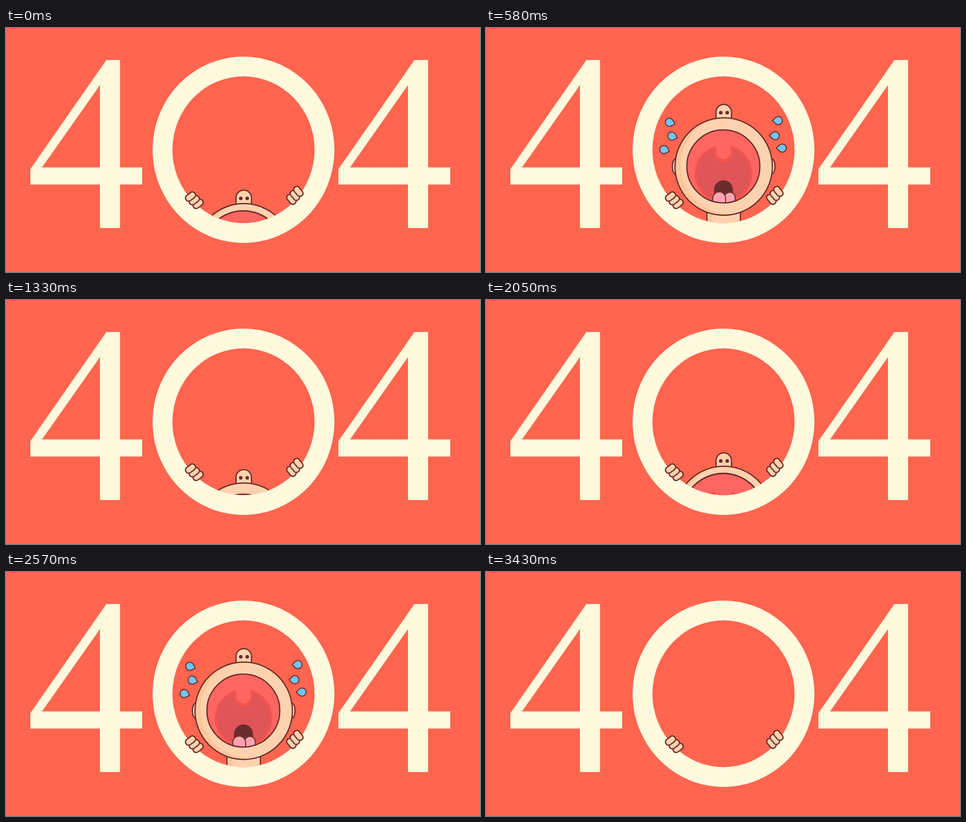
An HTML page for the animation above (3.52 s loop, 954 by 491 pixels).

```html
<!DOCTYPE html>
<html lang="en">
<head>
<meta charset="utf-8">
<title>404</title>
<style>
  html, body { margin: 0; width: 100%; height: 100%; overflow: hidden; background: #ff654f; }
  svg { display: block; width: 100%; height: 100%; }
  .line { stroke: #6b2c2a; stroke-width: 2.5; }
  .thin { stroke: #6b2c2a; stroke-width: 2; }
  .skin { fill: #ffd2af; }
  .shade { fill: #ffc59b; }
  .dark { fill: #6b2c2c; }
  .pink { fill: #ff6661; }
  .tongue { fill: #ffa3ae; }
  .tear { fill: #6fc6f8; }
  .cream { fill: #fff9dd; }
  .none { fill: none; }
</style>
</head>
<body>
<svg viewBox="0 0 954 491" role="img" aria-label="404">
  <defs>
    <path id="four" fill-rule="evenodd" d="M202 64.5H229.5V280.5H274V315H229.5V402.5H189V315H49V284ZM189 115L72.5 280.5H189Z"/>
    <path id="drop" d="M11.6 0L5.8 -5.8A8.2 8.2 0 1 0 5.8 5.8Z"/>
    <rect id="finger" x="-11.1" y="-6.3" width="22.2" height="12.6" rx="6"/>
    <g id="hand">
      <use href="#finger" x="1.6" y="10.5"/>
      <use href="#finger"/>
      <use href="#finger" x="-1.6" y="-10.5"/>
    </g>
    <clipPath id="hole"><path d="M335 0H621V245A143 147.6 0 0 1 335 245Z"/></clipPath>
    <clipPath id="face"><circle cx="478.4" cy="278.5" r="98"/></clipPath>
    <clipPath id="lips"><circle cx="477.7" cy="278.2" r="73"/></clipPath>
  </defs>

  <rect width="954" height="491" fill="#ff654f"/>
  <use href="#four" class="cream"/>
  <use href="#four" class="cream" x="620"/>
  <path class="cream" fill-rule="evenodd" d="M295 245a183 187.5 0 0 1 366 0a183 187.5 0 0 1 -366 0ZM335 245a143 147.7 0 0 0 286 0a143 147.7 0 0 0 -286 0Z"/>

  <g id="tears" class="tear thin"></g>

  <g clip-path="url(#hole)">
    <g id="body">
      <path class="shade" d="M444.5 350H512V620H444.5Z"/>
      <path class="skin" d="M456 350H512V620H456Z"/>
      <path class="line none" d="M444.5 350V620M512 350V620"/>
      <ellipse class="skin line" cx="381.5" cy="278.5" rx="6.5" ry="15"/>
      <ellipse class="skin line" cx="575.3" cy="278.5" rx="6.5" ry="15"/>
      <path class="skin line" d="M463 190V169a15.5 15.5 0 0 1 31 0V190Z"/>
      <circle class="dark" cx="472.5" cy="170" r="3.6"/>
      <circle class="dark" cx="485.5" cy="170" r="3.6"/>

      <circle class="shade" cx="478.4" cy="278.5" r="98"/>
      <circle class="skin" cx="490" cy="276" r="98" clip-path="url(#face)"/>
      <circle class="line none" cx="478.4" cy="278.5" r="98"/>

      <g id="mouth">
        <circle class="pink" cx="477.7" cy="278.2" r="73"/>
        <g clip-path="url(#lips)">
          <circle cx="478" cy="293" r="58" fill="#f3544f"/>
          <circle cx="478" cy="293" r="53.5" fill="#e05557"/>
          <circle cx="478" cy="250" r="20" fill="#f3544f"/>
          <path class="pink" d="M454 229Q467 236 464 250A14 14 0 0 0 492 250Q489 236 502 229Z"/>
          <path class="dark" d="M459 340V325a19 19 0 0 1 38 0V340Z"/>
          <path class="tongue thin" d="M480 356V340.5a10.7 10.7 0 0 1 21.4 0V356Z"/>
          <path class="tongue thin" d="M456.6 356V342a12.8 12.8 0 0 1 25.6 0V356Z"/>
        </g>
        <circle class="line none" cx="477.7" cy="278.2" r="73"/>
      </g>
    </g>
  </g>

  <g class="skin line">
    <use href="#hand" transform="translate(379 346.6) rotate(-37)"/>
    <use href="#hand" transform="translate(581.4 336.8) rotate(50)"/>
  </g>
</svg>
<script>
const LOOP = 3520, CYCLE = 2000, DEPTH = 250;
const $ = id => document.getElementById(id);
const clamp = x => Math.min(1, Math.max(0, x));
const ease = x => x * x * (3 - 2 * x);

// How far the body hangs below its highest pose: eased climb, accelerating drop.
const sink = u => DEPTH * (1 - ease(clamp((u + 350) / 950)))
  + 241 * Math.max(0, (u - 900) / 509) ** 1.5;

const gape = u => 1.07 + 0.07 * Math.cos(2 * Math.PI * (u - 35) / 960);

const fade = u => clamp((u - 400) / 120) * clamp((1165 - u) / 215);

// Tears by side, top to bottom, at the peak of their arcs.
const sides = [
  { dir: -1, tilt: 18, spots: [[370, 189.8], [374.7, 217.5], [358.5, 244.6]] },
  { dir: 1, tilt: 0, spots: [[587.4, 186.4], [581.3, 216.8], [595.8, 241.7]] }
];
const tears = sides.flatMap(({ dir, tilt, spots }) => spots.map(([x, y], i) => {
  const el = document.createElementNS("http://www.w3.org/2000/svg", "use");
  el.setAttribute("href", "#drop");
  $("tears").append(el);
  return { el, x, y, dir, tilt, reach: 44 - 10.5 * i };
}));

function draw(time) {
  const t = time % LOOP;
  const u = t < 1600 ? t : t - CYCLE;
  const v = (u - 570) / 410;
  const k = v * (0.75 + 0.25 * v);
  $("body").setAttribute("transform", `translate(0 ${sink(u)})`);
  $("mouth").setAttribute("transform",
    `translate(478 278.3) scale(${gape(u)}) translate(-478 -278.3)`);
  $("tears").setAttribute("opacity", fade(u));
  for (const { el, x, y, dir, tilt, reach } of tears) {
    el.setAttribute("transform",
      `translate(${x + dir * reach * k} ${y + 23.5 * k * k}) scale(${-dir} 1) rotate(${tilt - 22 * k})`);
  }
}

const start = performance.now();
function tick() {
  draw(performance.now() - start);
  requestAnimationFrame(tick);
}
tick();
</script>
</body>
</html>
```
